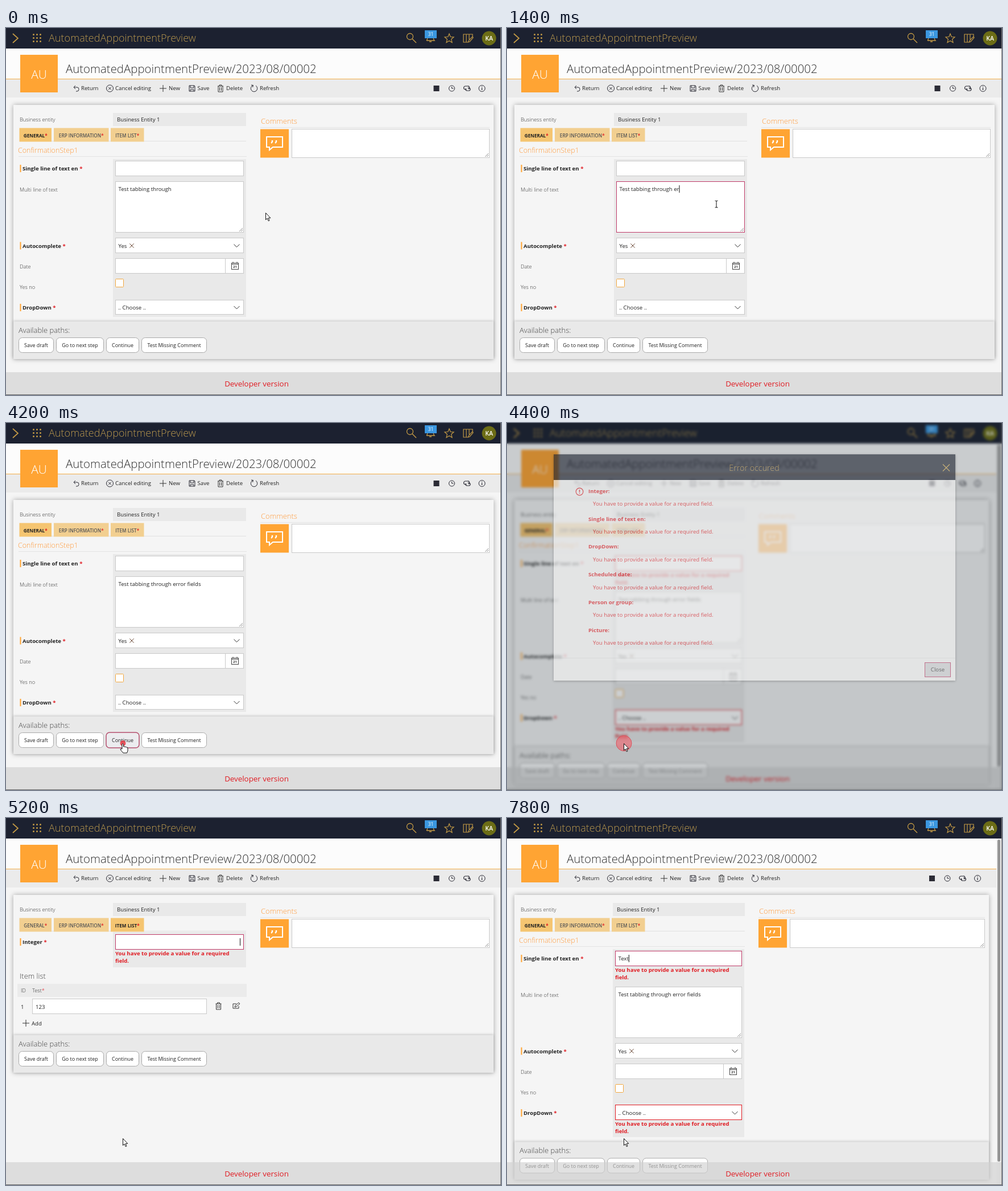
An HTML page that plays this animation: 870x644 px, repeating every 8000 ms.

```html
<!DOCTYPE html>
<html lang="en">
<head>
<meta charset="utf-8">
<title>Form validation</title>
<style>
html, body { margin: 0; width: 100%; height: 100%; overflow: hidden; background: #f5f5f5; }
svg, #veil { position: absolute; left: 0; top: 0; width: 870px; height: 644px; }
#veil { backdrop-filter: blur(2px); }
text { font-family: "Open Sans", "Noto Sans", sans-serif; white-space: pre; }
</style>
</head>
<body>
<svg id="page" viewBox="0 0 870 644"></svg>
<div id="veil"></div>
<svg id="front" viewBox="0 0 870 644"></svg>
<script>
const NAME = 'AutomatedAppointmentPreview';
const REQUIRED = 'You have to provide a value for a required';
const ORANGE = '#ffa433', GOLD = '#c39a45', NAVY = '#1c2130', RED = '#e01b22', PINK = '#bf3a68', INK = '#222', SIZE = 9.63;
const $ = id => document.getElementById(id);
const pen = document.createElement('canvas').getContext('2d');
pen.font = SIZE + 'px "Open Sans", "Noto Sans", sans-serif';
const widthOf = s => pen.measureText(s).width;

// y is the middle of the line
const text = (x, y, s, o = {}) => {
  const { size = SIZE, weight = 400, fill = INK, anchor = 'start' } = o;
  return `<text x="${x}" y="${y + size * .36}" font-size="${size}" font-weight="${weight}" fill="${fill}" text-anchor="${anchor}">${s}</text>`;
};
const rect = (x1, y1, x2, y2, fill, more = '') =>
  `<rect x="${x1}" y="${y1}" width="${x2 - x1}" height="${y2 - y1}" fill="${fill}" ${more}/>`;
const box = (x1, y1, x2, y2, stroke = '#c9c9c9', fill = '#fff', more = '') =>
  rect(x1 + .5, y1 + .5, x2 - .5, y2 - .5, fill, `stroke="${stroke}" ${more}`);
const path = (x, y, d, stroke = '#333', w = 1, fill = 'none') =>
  `<path transform="translate(${x} ${y})" d="${d}" stroke="${stroke}" stroke-width="${w}" fill="${fill}"/>`;
const ring = (x, y, r, stroke, w = 1, fill = 'none') =>
  `<circle cx="${x}" cy="${y}" r="${r}" stroke="${stroke}" stroke-width="${w}" fill="${fill}"/>`;
const star = '<tspan fill="#e01b22">*</tspan>';
const caret = (x, y) => rect(x, y - 7, x + 1, y + 6, '#111');
const chevron = (x, y) => path(x, y, 'M-5-2.5L0 2.5 5-2.5');
const cross = (x, y, r, c, w) => path(x, y, `M${-r} ${-r}L${r} ${r}M${r} ${-r}L${-r} ${r}`, c, w);
const grip = (x, y) => path(x, y, 'M-7-1L-1-7M-4-1L-1-4', '#777', .8);
const plus = (x, y) => path(x, y, 'M-6 0H6M0-6V6');
const trash = (x, y) => path(x, y, 'M-5-4H5M-2-4V-6H2V-4M-4-4V6H4V-4M-1.5-2V4M1.5-2V4');
const focusBox = (x1, y1, x2, y2, a = 1) => box(x1, y1, x2, y2, PINK, 'none', `opacity="${a}"`);
const light = { weight: 300, size: 9.3, fill: '#333' };
const heading = { weight: 300, size: 13, fill: '#444' };
const error = (x, y) => [REQUIRED, 'field.'].map((s, i) =>
  text(x, y + 7 + i * 13, s, { weight: 700, fill: RED })).join('');
const needed = (y, s) => rect(24.5, y - 7, 26.5, y + 6, ORANGE) + text(29, y, `${s} ${star}`, { weight: 700 });

function header() {
  let s = rect(0, 0, 870, 36, NAVY) + path(16, 18, 'M-4-8L5 0-4 8', GOLD, 1.7);
  for (let i = 0; i < 9; i++) s += ring(48.5 + i % 3 * 6, 11.5 + (i / 3 | 0) * 6, 1.5, 'none', 0, GOLD);
  return s + text(75, 17.5, NAME, { size: 18.1, weight: 300, fill: '#b8974d' })
    + ring(710, 15, 5.5, GOLD, 1.3) + path(714, 19, 'M0 0L7 7', GOLD, 1.4)
    + path(746, 18, 'M-7 4H7Q5 2 5-3Q4-7 0-7T-5-3Q-5 2-7 4M-2 6H2', GOLD, 1.3)
    + rect(736, 4, 757, 18, '#3b97e0') + text(746.5, 11, '31', { size: 8.5, fill: '#fff', anchor: 'middle' })
    + path(779, 18, 'M0-8L2.2-2.5 8-2 3.6 1.8 5 7.5 0 4.4-5 7.5-3.6 1.8-8-2-2.2-2.5Z', GOLD, 1.2)
    + path(812, 18, 'M-8-7H-3V7H-8ZM-3-7H8V-3M2-7V2M-3 7H0L2 3 8-3 9-1 3 6 0 7', GOLD, 1.2)
    + ring(849, 18, 12.5, 'none', 0, '#6c6d16') + text(849, 18, 'KA', { size: 10.5, fill: '#fff', weight: 600, anchor: 'middle' });
}

function toolbar(dx) {
  const y = 106, c = '#2b2b35';
  let s = rect(0, 36, 870, 89, '#fcfcfc') + rect(0, 89, 870, 90, '#f3ac47') + rect(0, 90, 870, 122, '#ebebeb')
    + rect(25, 47, 91, 113, ORANGE) + text(58, 81.5, 'AU', { size: 21, weight: 300, fill: '#fff', anchor: 'middle' })
    + text(105, 72, NAME + '/2023/08/00002', { size: 20.4, weight: 300, fill: '#333' });
  [[132, 'Return'], [192, 'Cancel editing'], [286, 'New'], [336.5, 'Save'], [387, 'Delete'], [446, 'Refresh']]
    .forEach(([x, label]) => s += text(x, y, label));
  s += path(123, y, 'M-1-5L-4-2-1 1M-4-2H2Q5-2 5 1.5T2 5H0', c)
    + ring(182.5, y, 6, c) + cross(182.5, y, 2.4, c, 1) + plus(276, y)
    + path(327, y, 'M-5-5H4L5-4V5H-5ZM-3-5V-1H3V-5M-3 5V2H3V5', c) + trash(377, y)
    + path(436, y, 'M-2-5.3A5.7 5.7 0 1 0 3-4.8M-5-6L-1.5-5.5-2.5-2', c);
  const x = 756.5 - dx;
  return s + rect(x - 5, y - 5, x + 5, y + 5, c)
    + ring(x + 27, y, 5, c) + path(x + 27, y, 'M0-3V0H3', c)
    + path(x + 54, y, 'M-1 2H-3A2.5 2.5 0 0 1-3-4H1A2.5 2.5 0 0 1 2 1M1-1H3A2.5 2.5 0 0 1 3 4H-1A2.5 2.5 0 0 1-2 0', c, 1.2)
    + ring(x + 80, y, 5.5, c) + path(x + 80, y, 'M0-1V3M0-3.5V-2.2', c, 1.2);
}

function generalTab(s) {
  const e = s.errors, L = e ? 190 : 192, R = e ? 413 : 418, d = e ? 27 : 0, tx = L + 5.5;
  const typed = s.multi, line = s.single;
  const edge = e ? RED : undefined;
  let o = text(21, 214, 'ConfirmationStep1', { ...heading, size: 12.5, fill: '#ff9a3c' })
    + rect(22, 225, R + 5, 226, '#e3e3e3') + rect(L - 4, 230, R + 4, e ? 560 : 507, '#e9e9e9')
    + needed(247, 'Single line of text en') + box(L, 233, R, 260, edge)
    + text(tx, 247, line) + focusBox(L, 233, R, 260, s.singleFocus);
  if (s.singleFocus === 1) o += caret(tx + widthOf(line), 247);
  if (e) o += error(L, 260) + error(L, 530);
  o += text(24, 284 + d, 'Multi line of text', light) + box(L, 269 + d, R, 359 + d)
    + grip(R - 1, 358 + d) + text(tx, 283 + d, typed) + focusBox(L, 269 + d, R, 359 + d, s.multiFocus);
  if (s.multiFocus === 1) o += caret(tx + widthOf(typed), 283);
  return o + needed(382.5 + d, 'Autocomplete') + box(L, 368 + d, R, 395 + d) + text(tx, 382.5 + d, 'Yes')
    + cross(L + 29, 382 + d, 3.7, '#6b4a38', 1) + chevron(R - 12.5, 382 + d) + focusBox(L, 368 + d, R, 395 + d, s.autoFocus)
    + text(24, 419 + d, 'Date', light) + box(L, 404 + d, R, 431 + d) + rect(R - 33, 405 + d, R - 32, 431 + d, '#c9c9c9')
    + box(R - 22, 412 + d, R - 9, 424 + d, '#444') + rect(R - 22, 414 + d, R - 9, 415 + d, '#444')
    + path(R - 15.5, 412 + d, 'M-3.5-2V1M3.5-2V1', '#444') + text(R - 15.5, 419 + d, '21', { size: 5.5, weight: 700, anchor: 'middle' })
    + text(24, 455 + d, 'Yes no', light) + box(L, 440 + d, L + 15, 455 + d, '#f2a83f', '#fff', 'rx="1"')
    + needed(491 + d, 'DropDown') + box(L, 477 + d - (e ? 1 : 0), R, 503 + d, edge)
    + text(L + 5, 490.5 + d, '.. Choose ..') + chevron(R - 12.5, 490.5 + d);
}

function itemTab(s) {
  return rect(188, 200, 422, 262, '#e9e9e9') + needed(218, 'Integer') + box(192, 204, 418, 231, PINK)
    + text(410.5, 218, s.integer, { anchor: 'end' }) + caret(411, 218) + error(192, 231)
    + text(24, 277, 'Item list', heading) + rect(20, 291, 423, 314, '#ebebeb')
    + text(26, 303, 'ID', light) + text(46, 303, 'Test' + star, light)
    + text(26, 331.5, '1') + box(46, 317, 353, 344) + text(52, 331.5, '123') + trash(373.5, 330)
    + path(404, 330, 'M1-4H-5V4H5V0M-2 2L-1-1 5-6 7-4 1 1Z') + plus(35, 360) + text(45, 360.5, 'Add');
}

function footer(y, right, pressed) {
  let o = rect(13, y, right, y + 66, '#e9e9e9', 'style="filter:drop-shadow(0 -1px 2px #0003)"')
    + text(22, y + 15, 'Available paths:', heading);
  [[22, 84, 'Save draft'], [88, 172, 'Go to next step'], [176, 234, 'Continue'], [238, 353, 'Test Missing Comment']]
    .forEach(([a, b, label], i) => {
      const on = pressed && i === 2, grow = on ? .5 : 0;
      o += box(a - grow, y + 28 - grow, b + grow, y + 55 + grow, on ? '#b5506f' : '#aaa', on ? '#ececef' : '#fff', `rx="6" stroke-width="${1 + grow}"`)
        + text((a + b) / 2, y + 42, label, { size: 8.95, anchor: 'middle' });
    });
  return o;
}

function page(s) {
  const e = s.errors, right = e ? 847 : 857, cx = e ? 442 : 447, ce = e ? 840 : 850;
  const top = s.items ? 381 : e ? 568.5 : 515;
  let o = rect(0, 0, 870, 644, '#f5f5f5') + header() + toolbar(e ? 9.5 : 0)
    + rect(13, 135, right, top + 66, '#f5f5f5', 'style="filter:drop-shadow(0 0 4px #0005)"')
    + text(24, 160.5, 'Business entity', light)
    + rect(e ? 186 : 188, 149, e ? 418 : 422, 172, '#e9e9e9') + text(e ? 193 : 195, 160.5, 'Business Entity 1')
    + rect(24, 198, e ? 418 : 422, 199, '#e0e0e0');
  [[23.5, 80, 'GENERAL'], [84, 180.5, 'ERP INFORMATION'], [184, 242.5, 'ITEM LIST']].forEach(([a, b, label], i) => {
    const on = i === (s.items ? 2 : 0);
    o += rect(a, 175.5, b, 199.5, on ? '#f5c571' : '#f2cf90')
      + text((a + b) / 2, 189, label + star, { size: 8.2, weight: on ? 700 : 600, fill: on ? INK : '#555', anchor: 'middle' });
  });
  o += text(cx + 1, 163, 'Comments', { ...heading, fill: '#ff9a3c' }) + rect(cx, 174, ce, 175, '#e3e3e3')
    + rect(cx, 177.5, cx + 50, 227.5, ORANGE)
    + path(cx + 25, 202, 'M-14-11H14V7H-3L-9 12V7H-14Z', '#fff', 2)
    + path(cx + 25, 201, 'M-4-4V-2Q-4 0-6 1M3-4V-2Q3 0 1 1', '#fff', 2.4)
    + box(cx + 55, 177, ce, 228) + grip(ce - 1, 227);
  o += (s.items ? itemTab(s) : generalTab(s)) + footer(top, right, s.pressed);
  if (e) o += rect(860, 36, 869, 644, '#f0f0f0') + rect(862, 38, 867, 603, '#969696', 'rx="2.5"');
  return o + rect(0, 604, 870, 644, 'rgba(210,210,210,.65)')
    + text(440.5, 624, 'Developer version', { size: 13.35, fill: RED, anchor: 'middle' })
    + rect(869, 0, 870, 644, '#777') + rect(0, 643, 870, 644, '#666');
}

function dialog() {
  let o = rect(82, 55, 788, 452, '#f5f5f5', 'style="filter:drop-shadow(0 1px 2px #0006)"') + rect(82, 55, 788, 100, NAVY)
    + text(434.5, 78.5, 'Error occured', { size: 14.3, weight: 300, fill: GOLD, anchor: 'middle' })
    + cross(772, 78.5, 6, GOLD, 1.2) + ring(127.5, 120.5, 6.3, RED, 1.2) + path(127.5, 120.5, 'M0-3.5V1M0 2.2V3.6', RED, 1.4);
  ['Integer', 'Single line of text en', 'DropDown', 'Scheduled date', 'Person or group', 'Picture'].forEach((s, i) => {
    const y = 119.5 + i * 48.75;
    o += text(143, y, s + ':', { weight: 700, fill: RED }) + text(151, y + 22.3, REQUIRED + ' field.', { fill: RED });
  });
  return o + rect(82, 412, 788, 413, '#e4e4e4') + box(734, 420, 780, 446, PINK, '#d3d5d9')
    + text(757, 433, 'Close', { fill: '#333', anchor: 'middle' });
}

const cursors = {
  arrow: (x, y) => path(x, y, 'M.5.5V12.5L3.2 10 5.2 14.6 7 13.8 5.1 9.3H8.8Z', '#111', 1, '#fff'),
  beam: (x, y) => path(x, y, 'M-2.5-6Q0-6 0-5Q0-6 2.5-6M0-5V5M-2.5 6Q0 6 0 5Q0 6 2.5 6', '#222', 1.1),
  hand: (x, y) => path(x, y, 'M-1 10V1.5Q0-.5 1.5 1.5V6Q3 5 4 6.5Q6 5.5 6.7 7.2Q9 6.5 9 9V13L7.5 17H1L-4 11Q-4 9-1 10Z', '#111', 1, '#fff')
};

function cursor(t) {
  const go = (a, b, p) => a + (b - a) * p;
  if (t < 600) {
    const p = t < 400 ? 0 : .5;
    return cursors[p ? 'beam' : 'arrow'](go(456, 368, p), go(324, 309, p));
  }
  const p = t < 3600 ? 0 : t < 3800 ? .3 : t < 4000 ? .75 : 1;
  const kind = p === 0 ? 'beam' : p < 1 || t >= 4400 ? 'arrow' : 'hand';
  return cursors[kind](go(368, 205, p), go(309, 562, p));
}

// characters typed since start, one batch per 200 ms
const steps = (t, start) => Math.max(0, (t - start) / 200 + 1);

function draw(t) {
  const rest = ' error fields', count = t < 1600 ? Math.min(3, steps(t, 1000)) : 3 + 2 * steps(t, 1600);
  $('page').innerHTML = page({
    items: t >= 5200 && t < 6200,
    errors: t >= 4400 && t < 5200 || t >= 6200,
    multi: 'Test tabbing through' + rest.slice(0, count),
    multiFocus: t < 800 || t >= 3000 ? 0 : t < 2800 ? 1 : .4,
    autoFocus: t < 2800 || t >= 4200 ? 0 : t < 3000 ? .6 : 1,
    pressed: t === 4200,
    integer: '123'.slice(0, steps(t, 5400)),
    single: 'Text'.slice(0, t < 7600 ? Math.min(2, steps(t, 7000)) : 2 + steps(t, 7600)),
    singleFocus: t < 6400 ? 0 : t < 6600 ? .5 : 1
  });
  const open = t >= 4400 && t < 5200, fading = t === 4400;
  $('veil').style.display = open ? 'block' : 'none';
  $('veil').style.background = `rgba(26,36,48,${fading ? .22 : .27})`;
  let o = open ? `<g opacity="${fading ? .62 : 1}">${dialog()}</g>` : '';
  if (t === 4200) o += ring(205.5, 562, 5, 'none', 0, '#e8303acc');
  if (fading) o += ring(205.5, 562, 13.5, '#d8505a', 1, '#f0606a99');
  $('front').innerHTML = o + cursor(t);
}

let shown = -1;
function tick(now) {
  const t = Math.floor(now % 8000 / 200) * 200;
  if (t !== shown) draw(shown = t);
  requestAnimationFrame(tick);
}
tick(performance.now());
</script>
</body>
</html>
```
